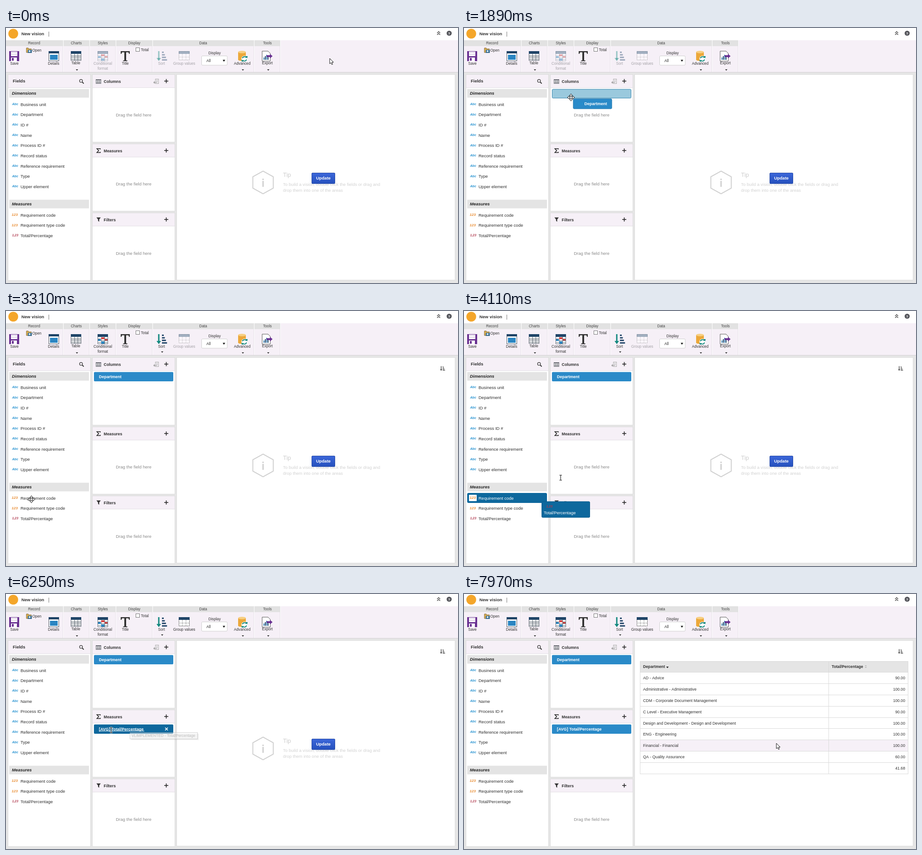
Animation of 997 by 562 pixels, one loop 8 s. Source, as an HTML page with a canvas:

```html
<!DOCTYPE html>
<html lang="en">
<head>
<meta charset="utf-8">
<title>Vision builder</title>
<style>
html, body { margin: 0; width: 100%; height: 100%; overflow: hidden; background: #e6e6e6; }
canvas { display: block; }
</style>
</head>
<body>
<canvas id="stage" width="997" height="562"></canvas>
<script>
const g = document.getElementById('stage').getContext('2d');
const LOOP = 8000;
const SANS = '"Liberation Sans", Arial, sans-serif';
const TINT = '#f6f0f7', NAVY = '#1f4467', BLUE = '#2a8ac8', DARK = '#0e689d', INK = '#303030';

// ---------- drawing helpers ----------
function rect(x, y, w, h, fill, line) {
  if (fill) { g.fillStyle = fill; g.fillRect(x, y, w, h); }
  if (line) { g.strokeStyle = line; g.lineWidth = 1; g.strokeRect(x + .5, y + .5, w - 1, h - 1); }
}
function round(x, y, w, h, r, fill, line) {
  g.beginPath(); g.roundRect(x, y, w, h, r);
  g.fillStyle = fill; g.fill();
  if (line) { g.strokeStyle = line; g.lineWidth = 1; g.stroke(); }
}
function text(s, x, y, size, color = INK, style = '', align = 'left', family = SANS) {
  g.font = `${style} ${size}px ${family}`;
  g.textAlign = align;
  g.fillStyle = color;
  g.fillText(s, x, y + size * .35);
}
function path(pts, fill, line, width = 1, close = true) {
  g.beginPath();
  pts.forEach(([x, y]) => g.lineTo(x, y));
  if (close) g.closePath();
  if (fill) { g.fillStyle = fill; g.fill(); }
  if (line) { g.strokeStyle = line; g.lineWidth = width; g.stroke(); }
}
const stroke = (pts, color, width = 1) => path(pts, null, color, width, false);
function circle(x, y, r, fill, line, width = 1) {
  g.beginPath(); g.arc(x, y, r, 0, Math.PI * 2);
  if (fill) { g.fillStyle = fill; g.fill(); }
  if (line) { g.strokeStyle = line; g.lineWidth = width; g.stroke(); }
}
function faded(alpha, draw) {
  g.save(); g.globalAlpha = alpha; draw(); g.restore();
}
const caret = (x, y) => path([[x - 2.5, y - 1], [x + 2.5, y - 1], [x, y + 2]], INK);
const plus = (x, y) => {
  stroke([[x - 4.5, y], [x + 4.5, y]], '#222', 1.6);
  stroke([[x, y - 4.5], [x, y + 4.5]], '#222', 1.6);
};

// ---------- pointer path ----------
// start, end, from, bend, to
const MOVES = [
  [30, 770, [714, 67], [400, 330], [57, 190]],
  [1030, 1830, [57, 190], [169, 246], [236, 153]],
  [2530, 3310, [236, 153], [52, 219], [56, 415]],
  [3320, 3490, [56, 415], [62, 436], [68, 460]],
  [3770, 4570, [68, 460], [301, 330], [240, 300]],
  [5450, 6250, [240, 300], [237, 312], [232, 300]],
  [6260, 7080, [232, 300], [461, 460], [689, 329]]
];
const clamp = v => Math.max(0, Math.min(1, v));
const bend = ([, , a, c, b], u) =>
  [0, 1].map(i => (1 - u) ** 2 * a[i] + 2 * u * (1 - u) * c[i] + u * u * b[i]);
function pointer(t, power = 1) {
  const m = MOVES.filter(v => v[0] <= t).pop() || MOVES[0];
  return bend(m, clamp((t - m[0]) / (m[1] - m[0])) ** power);
}

// ---------- toolbar ----------
function gridIcon(x, y, w, h, head, line) {
  rect(x, y, w, h, '#fff', line);
  rect(x, y, w, h * .28, head);
  for (let i = 1; i < 4; i++) {
    rect(x, Math.round(y + h * (.28 + .18 * i)), w, 1, line);
    if (i < 3) rect(Math.round(x + w * i / 3), y + h * .28, 1, h * .72, line);
  }
}
function sortIcon(x, y, s, arrow, bars) {
  stroke([[x + 5 * s, y], [x + 5 * s, y + 19 * s]], arrow, 3 * s);
  path([[x, y + 15 * s], [x + 10 * s, y + 15 * s], [x + 5 * s, y + 22 * s]], arrow);
  for (let i = 0; i < 4; i++) rect(x + 12 * s, y + (1 + i * 5.6) * s, (4 + i * 2.4) * s, 3 * s, bars);
}
function toolbar(hasField, hasMeasure) {
  rect(0, 0, 997, 27, '#fff');
  circle(16, 12.5, 10.8, '#f4a62a');
  text('New vision', 34, 12.5, 9.6, '#333', 'bold');
  rect(94, 8, 1, 11, '#777');
  for (const y of [11, 15]) stroke([[951, y], [954.3, y - 3], [957.6, y]], '#444', 1.5);
  circle(977.5, 11.5, 5.6, '#55565c');
  text('?', 977.5, 11.7, 8, '#fff', 'bold', 'center');

  rect(0, 27, 997, 71, TINT);
  rect(0, 97, 997, 1, '#d3d0d4');
  const groups = [['Record', 0, 126, 62], ['Charts', 127, 184, 155], ['Styles', 185, 242, 213.5],
    ['Display', 243, 323, 283], ['Data', 324, 547, 435], ['Tools', 548, 605, 576.5]];
  for (const [name, a, b, mid] of groups) {
    rect(a, 27, b - a, 13, '#e2e2e2');
    text(name, mid, 33, 8.2, '#444', '', 'center');
    rect(b, 27, 1, 70, '#fff');
    rect(b - 1, 40, 1, 57, '#e6e0e8');
  }
  const label = (s, x, y, color = INK) => text(s, x, y, 8.2, color, '', 'center');

  // save
  rect(7, 51, 22, 22, '#6a3192');
  rect(11, 52, 14, 10, '#fff');
  rect(12, 54, 12, 1, '#c8b4d6'); rect(12, 58, 12, 1, '#c8b4d6');
  rect(11, 65, 13, 8, '#fff'); rect(13, 66, 4, 6, '#6a3192');
  label('Save', 18.5, 78);
  // open
  path([[45, 44], [49, 44], [50, 46], [56, 46], [56, 54], [45, 54]], '#e0b04c', '#7c683e');
  rect(48, 48, 9, 7, '#3f6f91');
  circle(52, 51, 2, '#d9ecf7');
  text('Open', 58, 49, 8.2);
  // details
  rect(94, 51, 23, 22, '#fff', '#4b5560');
  rect(94, 51, 23, 5, NAVY);
  rect(97, 59, 17, 11, '#2c86c2');
  label('Details', 105, 78);
  gridIcon(143, 51, 23, 21, NAVY, '#555f6a');
  label('Table', 154, 77.5); caret(156.5, 92);
  // conditional format
  faded(hasField ? 1 : .4, () => {
    gridIcon(202, 51, 23, 22, NAVY, '#68727c');
    rect(210, 58, 7, 4, '#d94141'); rect(218, 62, 6, 3, '#d94141');
    rect(203, 62, 6, 4, '#2c86c2'); rect(210, 67, 7, 5, '#2c86c2');
  });
  const soft = on => on ? INK : '#a5a3a8';
  label('Conditional', 213.5, 78, soft(hasField));
  label('format', 213.5, 89, soft(hasField));
  // title
  path([[253, 51], [273, 51], [273, 57], [271.5, 57], [270, 53.5], [265, 53.5], [265, 71], [268, 72],
    [268, 73], [258, 73], [258, 72], [261, 71], [261, 53.5], [256, 53.5], [254.5, 57], [253, 57]], '#333');
  label('Title', 263, 78);
  rect(286, 43, 9, 9, '#fff', '#777');
  text('Total', 297.5, 48, 8.2);
  // sort
  faded(hasField ? 1 : .42, () => sortIcon(332, 51, 1, '#13897f', NAVY));
  label('Sort', 343, 78, soft(hasField));
  if (hasField) caret(344.5, 90);
  // group values
  faded(hasMeasure ? 1 : .4, () => {
    g.setLineDash([2, 1.5]);
    rect(381, 51, 24, 20, '#fff', '#333');
    for (const x of [389, 397]) stroke([[x, 57], [x, 71]], '#777');
    stroke([[381, 64], [405, 64]], '#777');
    g.setLineDash([]);
    rect(381, 51, 24, 6, NAVY);
  });
  label('Group values', 393, 78, soft(hasMeasure));
  text('Display', 460, 55, 8.3, INK, '', 'center');
  round(431.5, 61.5, 56.5, 20.5, 2, '#fff', '#cfcfcf');
  text('All', 442, 72, 8.6);
  path([[478, 70], [483.5, 70], [480.7, 74.5]], '#222');
  // advanced
  rect(512, 53, 17, 17, '#eca83a');
  g.fillStyle = '#eca83a';
  g.beginPath(); g.ellipse(520.5, 70, 8.5, 2.5, 0, 0, 7); g.fill();
  g.fillStyle = '#f7cf82';
  g.beginPath(); g.ellipse(520.5, 53, 8.5, 2.7, 0, 0, 7); g.fill();
  circle(526, 68, 6.8, '#fff');
  g.strokeStyle = '#16897d'; g.lineWidth = 2;
  for (const a of [.3, 3.44]) { g.beginPath(); g.arc(526, 68, 4.8, a, a + 2.3); g.stroke(); }
  path([[528, 62], [533, 62], [532, 67]], '#16897d');
  path([[519, 69], [520, 74], [524, 74]], '#16897d');
  label('Advanced', 521, 78); caret(522.5, 92);
  // export
  path([[565, 51], [578, 51], [583, 56], [583, 73], [565, 73]], '#fff', '#555');
  [5, 8, 11, 7].forEach((h, i) => rect(568 + i * 3, 70 - h, 2, h, i % 2 ? NAVY : '#3b81b5'));
  rect(575, 60, 8, 4, '#6a3192');
  path([[582, 57], [588, 62], [582, 67]], '#6a3192');
  label('Export', 576.5, 77.5); caret(578.5, 92);
}

// ---------- panels ----------
const ROWS = ['Business unit', 'Department', 'ID #', 'Name', 'Process ID #', 'Record status',
  'Reference requirement', 'Type', 'Upper element', 'Requirement code', 'Requirement type code', 'Total/Percentage']
  .map((name, i) => ({
    name,
    y: i < 9 ? 168 + i * 22.68 : 411.9 + (i - 9) * 22.8,
    kind: i < 9 ? 'Abc' : i < 11 ? '123' : '1,23'
  }));
const KINDS = { 'Abc': [7.1, '#2591d0'], '123': [8, '#e8892d'], '1,23': [7, '#b03a4e'] };
function tag(kind, x, y) {
  const [size, color] = KINDS[kind];
  text(kind, x, y, size, color, 'italic bold');
}
function panel(x, y, w, h, title, header = true) {
  rect(x - 1, y - 1, w + 2, h + 2, '#dcdcdc');
  rect(x, y, w, h, '#fff');
  if (!header) return;
  rect(x, y, w, 28, TINT);
  rect(x, y + 28, w, 1, '#e3dfe5');
}
function fields(hover) {
  panel(5, 103, 181, 453);
  text('Fields', 15, 116.5, 9.5, INK, 'bold');
  circle(165.5, 116.5, 3.2, null, '#333', 1.3);
  stroke([[168, 119], [171.5, 122.5]], '#333', 1.8);
  for (const [name, y] of [['Dimensions', 144], ['Measures', 388]]) {
    rect(7, y - 9.5, 176, 19, '#e4e4e4');
    text(name, 13, y, 9.5, '#222', 'italic bold');
  }
  for (const row of ROWS) {
    const on = row === hover;
    if (on) {
      round(7, row.y - 11, 176, 22, 3, DARK);
      round(11, row.y - 7, 17, 14, 1, '#fff');
    }
    tag(row.kind, row.kind === '123' ? 12.5 : 13.5, row.y - .5);
    text(row.name, 32, row.y + .3, 9.5, on ? '#fff' : INK);
  }
}
const hint = y => text('Drag the field here', 281.5, y, 9.55, '#8b8b8b', '', 'center');
const slot = y => round(194.5, y + .5, 174, 19.5, 2, '#9ac9dd', '#3986ae');
function chip(label, y, active) {
  round(194, y, 175, 20.5, 2, active ? DARK : BLUE);
  text(label, 205, y + 10, 8.95, '#fff', 'bold');
  if (!active) return;
  rect(205, y + 14, 100, 1, '#fff');
  stroke([[351, y + 7], [357, y + 13]], '#fff', 1.7);
  stroke([[357, y + 7], [351, y + 13]], '#fff', 1.7);
}
function areas(t) {
  panel(191, 103, 181, 148);
  panel(191, 256, 181, 147);
  panel(191, 408, 181, 148);
  [['Columns', 117.5], ['Measures', 270.5], ['Filters', 422.5]].forEach(([name, y]) => {
    text(name, 215.5, y, 8.9, INK, 'bold');
    plus(353.5, y - .5);
  });
  gridIcon(198, 113, 12, 10, '#70727a', '#85868d');
  rect(329, 112, 8, 11, '#f5f1f6', '#aaa');
  stroke([[333, 114], [333, 120], [327, 120]], '#999');
  path([[328, 117], [325, 120], [328, 123]], '#999');
  stroke([[208, 267.5], [208, 266], [200.5, 266], [204.5, 270.3], [200.5, 274.5], [208, 274.5], [208, 273]], '#222', 1.6);
  path([[199.5, 417.5], [209, 417.5], [205.5, 422], [205.5, 427], [203, 425], [203, 422]], '#333');

  if (t < 2050) hint(191.5);
  if (t >= 2050) chip('Department', 134.5, false);
  else if (t >= 1740) slot(134.5);
  if (t < 5030) hint(343.5);
  if (t >= 5030) chip('[AVG] Total/Percentage', 287.5, t < 6280);
  else if (t >= 4480) slot(287.5);
  hint(496.5);
}

// ---------- result area ----------
const RESULTS = [['AD - Advice', '90.00'], ['Administrative - Administrative', '100.00'],
  ['CDM - Corporate Document Management', '100.00'], ['C Level - Executive Management', '90.00'],
  ['Design and Development - Design and Development', '100.00'], ['ENG - Engineering', '100.00'],
  ['Financial - Financial', '100.00'], ['QA - Quality Assurance', '60.00'], ['', '41.68']];
function table(hovered) {
  rect(388, 148, 592, 25, '#e5e5e5');
  text('Department', 395, 160, 8.7, INK, 'bold');
  path([[446, 160], [451.5, 160], [448.7, 163.5]], '#222');
  text('Total/Percentage', 811, 160, 8.7, INK, 'bold');
  path([[884, 159], [888.5, 159], [886.2, 157]], '#aaa');
  path([[884, 161], [888.5, 161], [886.2, 163]], '#aaa');
  RESULTS.forEach(([name, value], i) => {
    const y = 173 + i * 24.88, line = Math.round(y);
    if (i === 6 && hovered) rect(388, line, 592, 25, TINT);
    text(name, 395, y + 12, 8.78);
    text(value, 973, y + 12, 8.7, INK, '', 'right');
    rect(388, line - 1, 592, 1, '#dadada');
  });
  rect(388, 148, 592, 249, null, '#dadada');
  rect(804, 148, 1, 249, '#dadada');
}
function tip(hot) {
  const hex = [];
  for (let i = 0; i < 6; i++) {
    const a = Math.PI * (i / 3 - .5);
    hex.push([567 + 26 * Math.cos(a), 340.3 + 25 * Math.sin(a)]);
  }
  path(hex, null, '#cfcfcf', 2);
  rect(565.5, 332, 3, 3, '#cfcfcf');
  rect(565.5, 337, 3, 13, '#cfcfcf');
  text('Tip', 611, 323.5, 13, '#cdcdcd');
  text('To build a vision, double click the fields or drag and', 611, 344.5, 9.5, '#d2d2d2');
  text('drop them into one of the areas', 611, 357.5, 9.5, '#d2d2d2');
  const fill = g.createLinearGradient(0, 320, 0, 343);
  fill.addColorStop(0, hot ? '#4a76e4' : '#3b66d9');
  fill.addColorStop(1, hot ? '#2e5ace' : '#2550bd');
  round(674.5, 319.5, 51, 23.5, 1.5, fill, '#2347a3');
  text('Update', 700, 331, 9.5, '#fff', 'bold', 'center');
}
function result(t) {
  panel(377, 103, 613, 452, '', false);
  if (t >= 2200) sortIcon(957.5, 121.5, .47, '#444', '#444');
  if (t >= 7540) table(t >= 7740);
  else tip(t >= 7110);
}

// ---------- overlays ----------
function dragLabel(t) {
  if (t >= 1060 && t < 2000) {
    const [x, y] = pointer(t, 1.65);
    round(x + 5, y + 3, 85, 22, 2, t < 1700 ? DARK : BLUE, '#1f76ab');
    tag('Abc', x + 14, y + 13.5);
    text('Department', x + 29.5, y + 14.3, 9, '#fff', 'bold');
  } else if (t >= 3800 && t < 5030) {
    const [x, y] = pointer(t, 1.62);
    round(x + 5, y + 19, 106, 35, 2, DARK, '#0c5d8d');
    tag('1,23', x + 15, y + 30);
    text('Total/Percentage', x + 9.5, y + 43.5, 9.4, '#fff');
  }
}
function tooltip(t) {
  const alpha = Math.min(clamp((t - 5180) / 80), clamp((6290 - t) / 90));
  if (alpha) faded(alpha, () => {
    rect(276, 308, 149, 14, 'rgba(0,0,0,.14)');
    rect(273, 305, 150, 15, '#fbfbfb', '#9a9a9a');
    text('VLIMPLEMENTED - Total/Percentage', 277, 312.3, 8.35, '#777');
  });
}
const CURSORS = {
  arrow() {
    path([[0, 0], [0, 11.8], [2.7, 9.4], [4.7, 13.6], [6.6, 12.8], [4.8, 8.7], [8.3, 8.4]], '#fff', '#111');
  },
  move() {
    const arm = [[-1.2, -1.2], [-1.2, -4], [-3.3, -4], [0, -8], [3.3, -4], [1.2, -4]];
    const pts = [];
    for (let i = 0; i < 4; i++) {
      const c = [1, 0, -1, 0][i], s = [0, 1, 0, -1][i];
      arm.forEach(([x, y]) => pts.push([x * c - y * s, x * s + y * c]));
    }
    path(pts, '#fff', '#111');
  },
  beam() {
    for (const [color, w] of [['#fff', 2.6], ['#222', 1.2]]) {
      stroke([[0, -5], [0, 5]], color, w);
      for (const y of [-5.5, 5.5]) stroke([[-2.7, y], [2.7, y]], color, w);
    }
  },
  hand() {
    path([[0, 0], [2, 0], [2, 6], [9, 7.5], [9, 12], [7.5, 16], [1, 16], [-3.5, 10], [-3, 8.5], [0, 10]], '#fff', '#111');
  }
};
function cursor(t) {
  const kind = t < 770 ? 'arrow' : t < 3770 ? 'move' : t < 6280 ? 'beam' :
    t >= 7110 && t < 7540 ? 'hand' : 'arrow';
  g.save();
  g.translate(...pointer(t));
  g.lineJoin = 'round';
  CURSORS[kind]();
  g.restore();
}
function hoveredRow(t) {
  if (!(t >= 740 && t < 1830 || t >= 3400 && t < 4570)) return null;
  const [x, y] = pointer(t, 1.62);
  return x < 184 ? ROWS.find(r => Math.abs(r.y - y) < 11.4) : null;
}

function draw(t) {
  rect(0, 0, 997, 562, '#e6e6e6');
  toolbar(t >= 2200, t >= 5140);
  fields(hoveredRow(t));
  areas(t);
  result(t);
  dragLabel(t);
  tooltip(t);
  cursor(t);
}
const begin = performance.now();
function tick() {
  draw((performance.now() - begin) % LOOP);
  requestAnimationFrame(tick);
}
tick();
</script>
</body>
</html>
```
